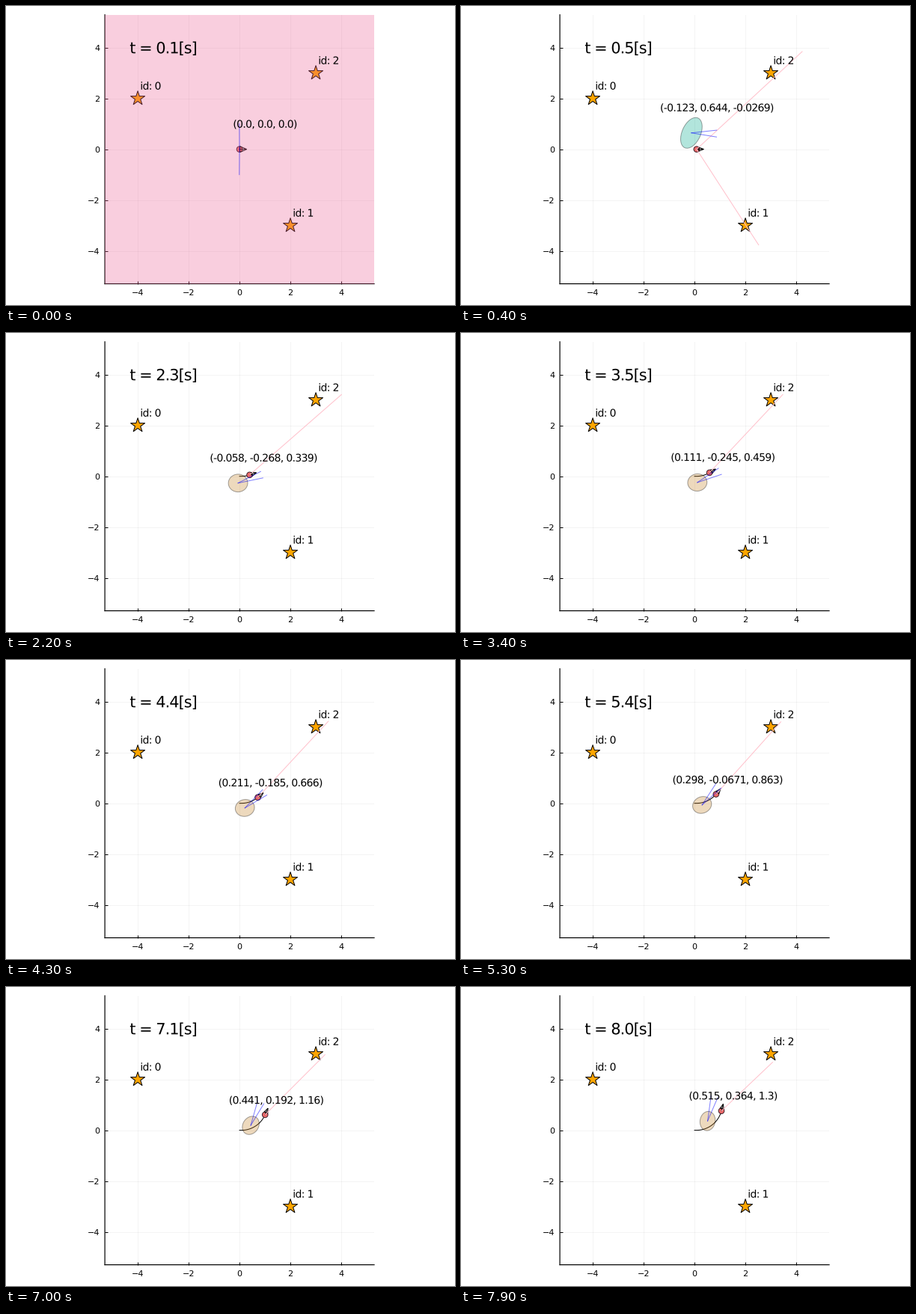
A matplotlib script that plays this animation: 600 px wide and 400 px high, repeating every 8 s.

```python
import numpy as np
import matplotlib.pyplot as plt
from matplotlib.animation import FuncAnimation
from matplotlib.patches import Circle, Ellipse, PathPatch, Polygon
from matplotlib.path import Path
from matplotlib.textpath import TextPath

STEPS, DT, PX = 80, 0.1, 1 / 34
HAIR = 0.72  # one pixel in points at 100 dpi
MARKS = [(-4, 2), (2, -3), (3, 3)]
FILLS = ["#ED5E93", "#C68225", "#00A98D"]  # by number of landmarks in view
TURN, RADIUS, STRAIGHT = np.radians(10), 1.016, 0.35
TRACKING = -0.045  # letter spacing in em

# key points of the estimate: time, x, y, heading
TIMES, EST_X, EST_Y, EST_TH = np.array([
    (0.1, 0, 0, 0), (0.2, -0.4, 4.5, -0.3), (0.5, -0.123, 0.644, -0.0269),
    (1, -0.14, -0.2, 0.11), (2.3, -0.058, -0.268, 0.339), (3.5, 0.111, -0.245, 0.459),
    (4.4, 0.211, -0.185, 0.666), (6.3, 0.376, 0.0391, 1.04), (8, 0.515, 0.364, 1.3)]).T

# sensor errors for landmarks 1 and 2: range factor and bearing
rng = np.random.default_rng(4)
reach = 1.36 - 0.005 * np.arange(STEPS)[:, None] + rng.normal(0, 0.05, (STEPS, 2))
skew = np.radians(rng.normal(-3, 2, (STEPS, 2)))


def pose(s):
    """True x, y and heading after s seconds."""
    th = TURN * np.maximum(s - STRAIGHT, 0)
    x = 0.21 * np.minimum(s, STRAIGHT) + RADIUS * np.sin(th)
    return x, RADIUS * (1 - np.cos(th)), th


def belief(t):
    """Ellipse semi-axes and tilt (deg), and heading spread (deg)."""
    if t <= DT:
        return 30, 30, 0, 90.4  # nothing known yet
    major = 0.38 + 0.26 * np.exp((0.5 - t) / 0.25)
    minor = 0.37 - 0.009 * t
    tilt = 66 * np.exp(-max(t - 0.5, 0) / 0.4) + 80 * (t / 8) ** 3
    return major, minor, tilt, 7.7


def ray(x, y, ang, length):
    return [x, x + length * np.cos(ang)], [y, y + length * np.sin(ang)]


def number(v):
    text = f"{v:.3g}"
    return text if "." in text else text + ".0"


glyphs = {}


def glyph(c):
    """Outline and advance of one character at size 1."""
    if c not in glyphs:
        bar, pair = (TextPath((0, 0), s, size=1).get_extents().x1 for s in ("|", c + "|"))
        glyphs[c] = TextPath((0, 0), c, size=1), pair - bar
    return glyphs[c]


def text_path(x, y, text, px):
    """Outline of text with its digits centred on (x, y)."""
    parts, pen = [], 0
    for c in text:
        shape, advance = glyph(c)
        if c != " ":
            parts.append(Path(shape.vertices + (pen, 0), shape.codes))
        pen += advance + TRACKING
    whole = Path.make_compound_path(*parts)
    return Path((whole.vertices - (pen / 2, 0.365)) * px * PX + (x, y), whole.codes)


fig = plt.figure(figsize=(6, 4), dpi=100, facecolor="white")
ax = fig.add_axes([132.1 / 600, 28.4 / 400, 359.9 / 600, 359.9 / 400])
lim = 180 * PX
ax.set(xlim=(-lim, lim), ylim=(-lim, lim), xticks=range(-4, 5, 2), yticks=range(-4, 5, 2))
ax.spines[["top", "right"]].set_visible(False)
for side in ("left", "bottom"):
    ax.spines[side].set(linewidth=1.2 * HAIR, snap=False)
ax.tick_params(direction="in", length=3, width=HAIR, pad=5, labelsize=8)
ax.grid(color="black", alpha=0.045, lw=HAIR)
ax.set_axisbelow(True)


def label(x, y, text, px):
    return ax.add_patch(PathPatch(text_path(x, y, text, px), fc="black", lw=0,
                                  clip_on=False, zorder=9))


def line(color, z, **kw):
    return ax.plot([], [], color=color, lw=HAIR, zorder=z, snap=False, **kw)[0]


def star(x, y):
    ang = np.pi / 2 + np.arange(10) * np.pi / 5
    r = np.where(np.arange(10) % 2, 3.82, 10) * PX
    ax.add_patch(Polygon(np.c_[x + r * np.cos(ang), y + r * np.sin(ang)], fc="orange",
                         ec="black", lw=HAIR, joinstyle="round", zorder=3))


for i, (mx, my) in enumerate(MARKS):
    star(mx, my)
    label(mx + 0.5, my + 0.5, f"id: {i}", 13.9)
clock = label(-3, 4, "0", 20.8)
readout = label(1, 1, "0", 13.9)

path = line("black", 3.1)
body = ax.add_patch(Circle((0, 0), 3.8 * PX, fc="#F06A6A", ec="#40202A", lw=HAIR, zorder=3.2))
shaft = line("black", 3.3)
head = ax.add_patch(Polygon([(0, 0)] * 3, fill=False, ec="black", lw=HAIR, zorder=3.3))
sights = [line("pink", 3.5) for _ in range(2)]
blob = ax.add_patch(Ellipse((0, 0), 1, 1, lw=HAIR, ec=(0, 0, 0, 0.35), zorder=4))
fan = [line("blue", 4.5, alpha=0.5) for _ in range(2)]


def draw_robot(n):
    x, y, th = pose(n * DT)
    path.set_data(*pose(np.arange(n + 1) * DT)[:2])
    body.center = x, y
    shaft.set_data(*ray(x, y, th, 9 * PX))
    u = np.array([np.cos(th), np.sin(th)])
    v = np.array([-u[1], u[0]])
    wing, back = (4, 0.5) if n == 0 else (2.6, 3)
    c = np.array([x, y])
    head.set_xy([c + (back * u + wing * v) * PX, c + 9.5 * PX * u,
                 c + (back * u - wing * v) * PX])


def draw_sights(n):
    """Draw the sensor rays and return how many landmarks are in view."""
    x, y, th = pose(n * DT)
    seen = 0
    for sight, (mx, my), r, b in zip(sights, MARKS[1:], reach[n], skew[n]):
        ang = np.arctan2(my - y, mx - x)
        visible = n > 0 and abs(ang - th) < np.pi / 3
        sight.set_visible(visible)
        sight.set_data(*ray(x, y, ang + b, r * np.hypot(mx - x, my - y)))
        seen += int(visible)
    return seen


def draw_belief(t, seen):
    x, y, th = (np.interp(t, TIMES, col) for col in (EST_X, EST_Y, EST_TH))
    major, minor, tilt, spread = belief(t)
    blob.set(center=(x, y), width=2 * major, height=2 * minor, angle=tilt)
    blob.set_facecolor((FILLS[seen], 0.3))
    for arm, sign in zip(fan, (1, -1)):
        arm.set_data(*ray(x, y, th + sign * np.radians(spread), 1))
    text = f"({number(x)}, {number(y)}, {number(th)})"
    readout.set_path(text_path(x + 1, y + 1, text, 13.9))


def update(n):
    t = round((n + 1) * DT, 1)
    clock.set_path(text_path(-3, 4, f"t = {t:.1f}[s]", 20.8))
    draw_robot(n)
    draw_belief(t, draw_sights(n))
    return []


anim = FuncAnimation(fig, update, frames=STEPS, interval=100, init_func=lambda: [],
                     repeat=True, repeat_delay=0)
plt.show()
```
